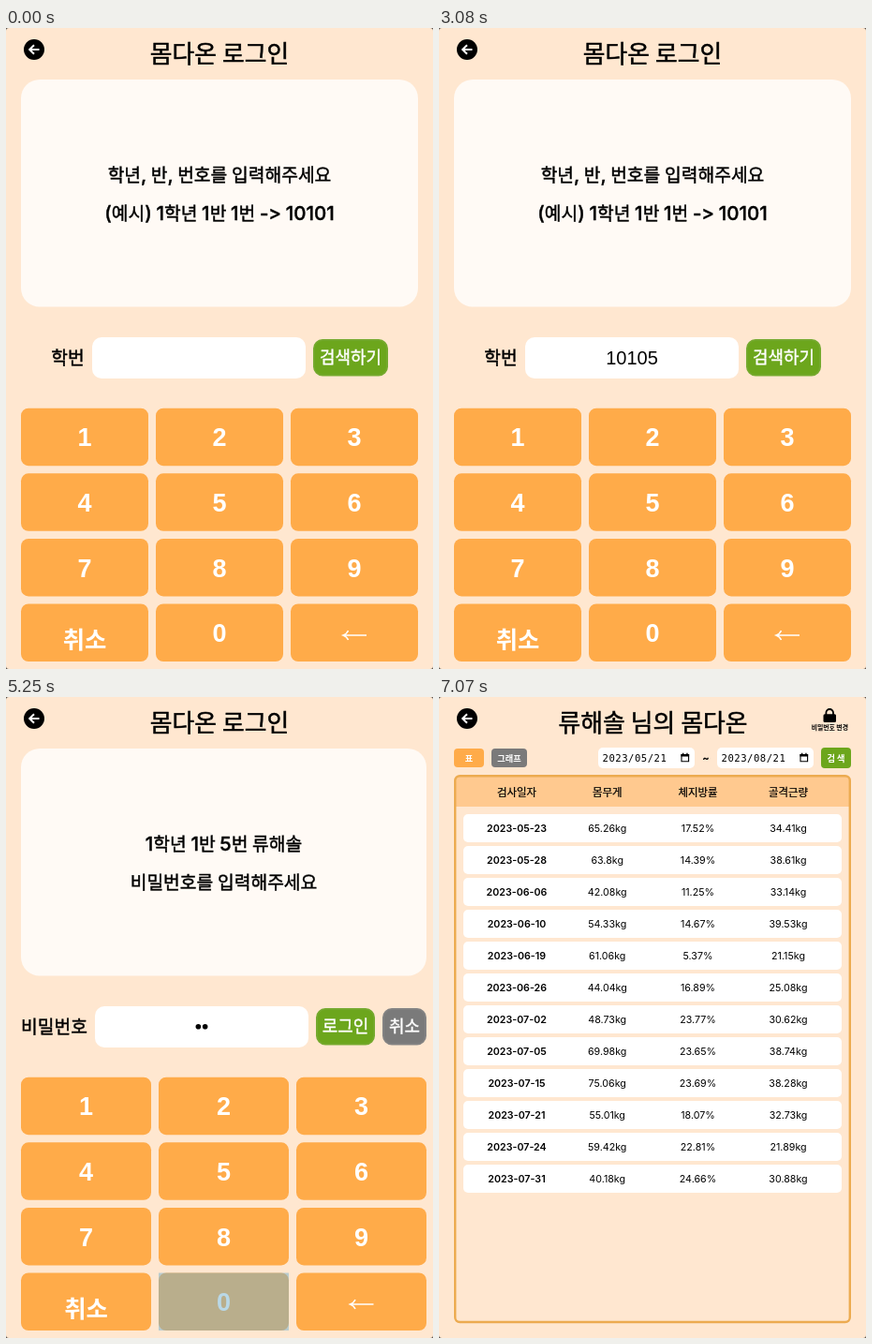
Animation, 456 px wide and 684 px high, one loop 8 s. Source, as an HTML page:

```html
<!DOCTYPE html>
<html lang="ko">
<head>
<meta charset="utf-8">
<title>로그인</title>
<style>
html, body { margin: 0; width: 100%; height: 100%; overflow: hidden; background: #4a4642; }
svg { display: block; width: 456px; height: 684px; }
text { font-family: Inter, 'Noto Sans CJK KR', sans-serif; text-anchor: middle; word-spacing: -.04em; }
.ko { font-family: 'Noto Sans CJK KR', 'Noto Sans CJK', sans-serif; font-size: .94em; }
.medium { font-weight: 500; stroke-width: .02em; }
.bold { font-weight: 700; }
.semi { font-weight: 600; }
.arial { font-family: 'Liberation Sans', Arial, sans-serif; }
.mono { font-family: 'DejaVu Sans Mono', monospace; text-anchor: start; letter-spacing: .5px; }
</style>
</head>
<body>
<svg id="stage" viewBox="0 0 456 684"></svg>
<script>
const LOOP = 8000, STEP = 70;
const PAPER = '#ffe7d0', ORANGE = '#ffab49', PRESSED = '#b46e1c', GREEN = '#6ca61c', GRAY = '#7a7a7a';
const BRAND = '몸다온', PERSON = '류해솔';

// key, press time, release time
const idPresses = [['1', 490, 560], ['0', 1400, 1470], ['1', 1960, 2030], ['0', 2520, 2590], ['5', 2940, 3080]];
const pinPresses = [4830, 5180, 5600, 6020];
const PIN_AT = 3850, TABLE_AT = 6930;

const rect = (x, y, w, h, r, fill, extra = '') =>
  `<rect x="${x}" y="${y}" width="${w}" height="${h}" rx="${r}" fill="${fill}" ${extra}/>`;
const text = (s, x, y, size, cls = 'medium', fill = '#000') => {
  const body = s.replace(/[가-힣]+/g, m => `<tspan class="ko">${m}</tspan>`).replace('->', '-&gt;');
  const stroke = cls === 'medium' ? `stroke="${fill}"` : '';
  return `<text x="${x}" y="${y}" font-size="${size}" class="${cls}" fill="${fill}" ${stroke}>${body}</text>`;
};
const button = (label, x, w, fill, edge) =>
  rect(x + 1, 333, w - 2, 37.5, 9, fill, `stroke="${edge}" stroke-width="2"`) +
  text(label, x + w / 2, 357.5, 19.1, 'medium', '#fff');

const backIcon = `<circle cx="30" cy="23" r="11"/>
  <path d="M35.5 23H25.5M30 18.2L25.2 23L30 27.8" fill="none" stroke="#fff" stroke-width="2"/>`;

function keypad(id, w) {
  const labels = ['1', '2', '3', '4', '5', '6', '7', '8', '9', '취소', '0', '←'];
  return labels.map((s, i) => {
    const x = 16 + (i % 3) * (w + 8), y = 405.7 + Math.floor(i / 3) * 69.6, cx = x + w / 2;
    let face;
    if (s === '←') {
      face = `<path d="M${cx + 13} ${y + 33.5}h-25m5.5 -5q-1.5 3.5 -5.5 5q4 1.5 5.5 5" fill="none" stroke="#fff" stroke-width="1.5"/>`;
    } else {
      face = s === '취소' ? text(s, cx, y + 47.7, 27, 'bold', '#fff')
        : text(s, cx, y + 40.7, 27, 'arial bold', '#fff');
    }
    return `<g id="${id}${i}" fill="${ORANGE}"><rect x="${x}" y="${y}" width="${w}" height="61.5" rx="8"/>${face}</g>`;
  }).join('');
}

function form(id, panelW, lines, keyW) {
  const cx = 16 + panelW / 2;
  return backIcon + text(BRAND + ' 로그인', 228, 36.6, 27.4) +
    rect(16, 55, panelW, 242.5, 20, '#fffaf5') +
    text(lines[0], cx, 164, 20.5) + text(lines[1], cx, 205, 20.5) + keypad(id, keyW);
}

const idPage = form('a', 424, ['학년, 반, 번호를 입력해주세요', '(예시) 1학년 1반 1번 -> 10101'], 136) +
  text('학번', 66, 359.3, 20.5) + rect(92, 330, 228, 44, 10, '#fff') +
  button('검색하기', 328, 80, GREEN, '#74a92d') +
  '<text id="typed" class="arial" x="206" y="359" font-size="20"></text>';

const pinPage = form('b', 433, [`1학년 1반 5번 ${PERSON}`, '비밀번호를 입력해주세요'], 139) +
  text('비밀번호', 51.5, 359.3, 20.5) + rect(95, 330, 228, 44, 10, '#fff') +
  button('로그인', 331, 63, GREEN, '#74a92d') + button('취소', 402, 47, GRAY, '#838383') +
  '<g id="dots"></g>' + rect(163, 614.5, 139, 61.5, 0, 'rgb(117,177,207)', 'id="tint" opacity="0"');

const dateBox = (x, date) => rect(x, 54, 103, 22, 5, '#fff') +
  text(date, x + 4.5, 69, 10.6, 'mono') +
  `<path d="M${x + 89} 61.5h7.6v7.3h-7.6z" fill="none" stroke="#000" stroke-width="1.1"/>
   <path d="M${x + 88.5} 61h8.6v2.6h-8.6zM${x + 90} 59.7h1.3v2h-1.3zM${x + 94.3} 59.7h1.3v2h-1.3z"/>`;

const rows = `05-23 65.26 17.52 34.41|05-28 63.8 14.39 38.61|06-06 42.08 11.25 33.14|06-10 54.33 14.67 39.53
|06-19 61.06 5.37 21.15|06-26 44.04 16.89 25.08|07-02 48.73 23.77 30.62|07-05 69.98 23.65 38.74
|07-15 75.06 23.69 38.28|07-21 55.01 18.07 32.73|07-24 59.42 22.81 21.89|07-31 40.18 24.66 30.88`
  .split('|').map(r => r.trim().split(' '));
const columns = [83, 179.7, 276.5, 373];

const tablePage = backIcon + text(`${PERSON} 님의 ${BRAND}`, 228.5, 36.6, 27.4) +
  `<rect x="410.5" y="18.3" width="13.5" height="8.7" rx="1.5"/>
   <path d="M413.4 19v-2.2a3.8 3.8 0 0 1 7.6 0v2.2" fill="none" stroke="#000" stroke-width="1.8"/>` +
  text('비밀번호 변경', 417.3, 35, 7.3, 'bold') +
  rect(16, 55, 32, 20, 4, ORANGE) + text('표', 32, 68.6, 9.8, 'bold', '#fff') +
  rect(56, 55, 38, 20, 4, GRAY) + text('그래프', 75, 68.6, 9.8, 'bold', '#fff') +
  dateBox(170, '2023/05/21') + text('~', 285, 69, 11, 'bold') + dateBox(297, '2023/08/21') +
  rect(408, 54, 32, 22, 4, GREEN) + text('검 색', 424, 68.6, 9.8, 'bold', '#fff') +
  rect(17, 84, 422, 33, 5, '#ffc98f') + rect(17, 110, 422, 7, 0, '#ffc98f') +
  rect(17.2, 84.2, 421.6, 582.8, 5, 'none', 'stroke="#ecab50" stroke-width="2.4"') +
  ['검사일자', '몸무게', '체지방률', '골격근량'].map((s, i) => text(s, columns[i], 106.2, 12.2)).join('') +
  rows.map((r, i) => {
    const y = 125 + i * 34;
    const cells = ['2023-' + r[0], r[1] + 'kg', r[2] + '%', r[3] + 'kg'];
    return rect(26, y, 404, 30, 5, '#fff') +
      cells.map((s, c) => text(s, columns[c], y + 19, 10.7, c ? '' : 'semi')).join('');
  }).join('');

const $ = id => document.getElementById(id);
$('stage').innerHTML = rect(0, 0, 456, 684, 3, PAPER) +
  [idPage, pinPage, tablePage].map((p, i) => `<g id="page${i}">${p}</g>`).join('');

const keyIndex = k => k === '0' ? 10 : k - 1;

function draw(t) {
  const page = t < PIN_AT ? 0 : t < TABLE_AT ? 1 : 2;
  for (let i = 0; i < 3; i++) $('page' + i).style.display = i === page ? '' : 'none';

  $('typed').textContent = idPresses.filter(p => t >= p[2]).map(p => p[0]).join('');
  const held = idPresses.find(p => t >= p[1] && t < p[2]);
  for (let i = 0; i < 12; i++) {
    $('a' + i).setAttribute('fill', held && keyIndex(held[0]) === i ? PRESSED : ORANGE);
  }

  // each tap: dark for one step, then a bluish highlight that fades
  const count = pinPresses.filter(p => t >= p + STEP).length;
  $('dots').innerHTML = Array.from({ length: count }, (_, i) =>
    `<circle cx="${209 + (i - (count - 1) / 2) * 7.3}" cy="351.7" r="2.8"/>`).join('');
  const last = pinPresses.filter(p => t >= p).pop();
  const phase = last === undefined ? 9 : Math.floor((t - last) / STEP);
  $('b10').setAttribute('fill', phase === 0 ? PRESSED : ORANGE);
  $('tint').setAttribute('opacity', phase === 1 ? .5 : phase === 2 ? .22 : 0);
}

function tick() {
  draw(performance.now() % LOOP);
  requestAnimationFrame(tick);
}
tick();
</script>
</body>
</html>
```
